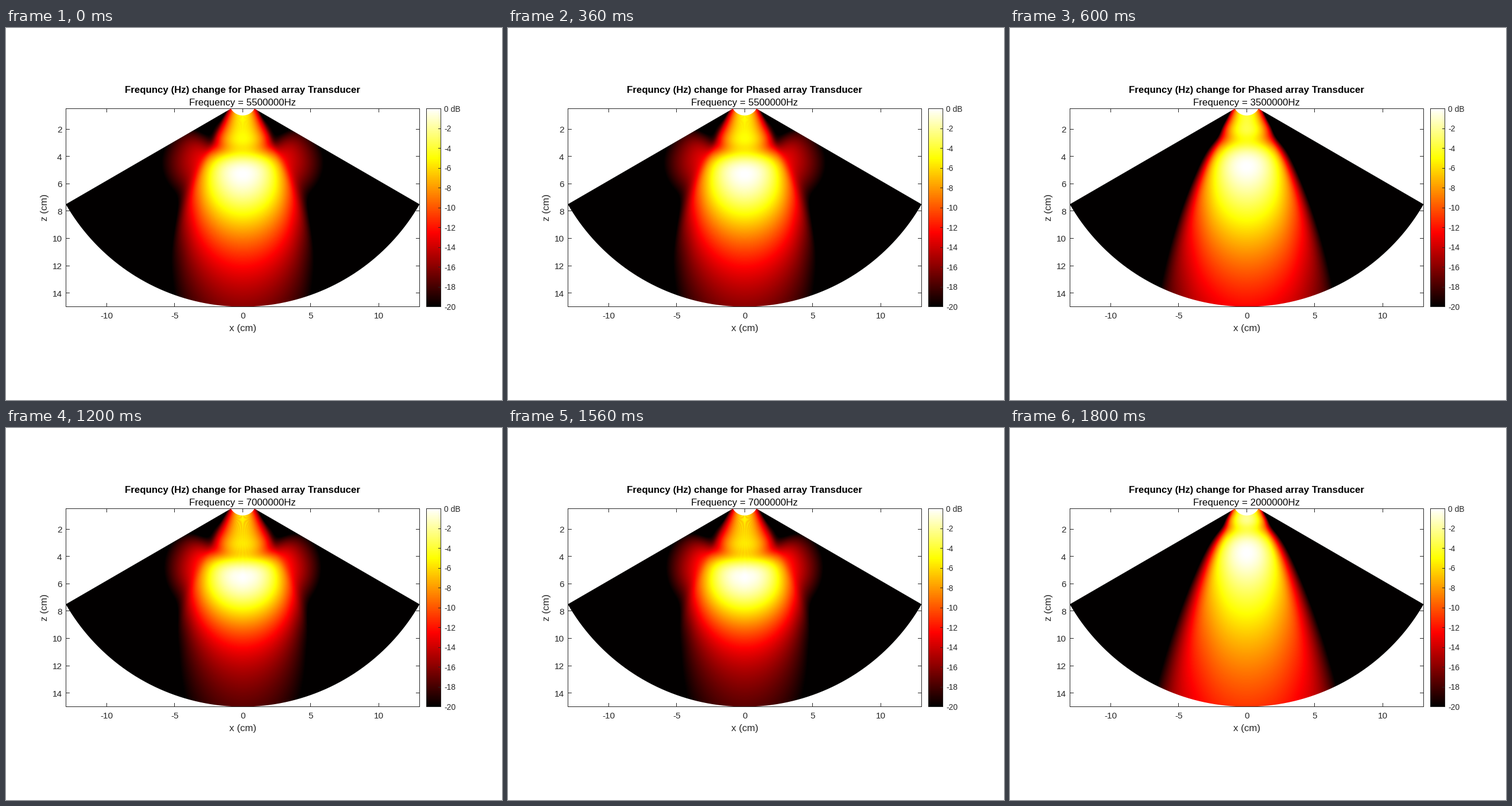
A matplotlib script that plays this animation: 864x648 px, repeating every 2400 ms.

```python
import numpy as np
import matplotlib.pyplot as plt
from matplotlib.animation import FuncAnimation
from matplotlib.colors import ListedColormap
from matplotlib.path import Path

W, H = 864, 648
GREY = "#262626"
FREQS = [5.5, 3.5, 7.0, 2.0]  # MHz

# Plot box and colour bar, in pixels
LEFT, RIGHT, TOP, BOTTOM = 104.5, 720.5, 140.5, 485.5
BAR_L, BAR_R = 732.5, 757.5
X0, SX = 412.3, 23.72
SZ = (BOTTOM - TOP) / 14.5

# Phased array: millimetres and microseconds
C = 1.54
COUNT, PITCH, WIDTH = 64, 0.3, 0.25
HEIGHT, FOCUS = 14.0, 60.0
BAND = 0.74
ELEMENTS = (np.arange(COUNT) - (COUNT - 1) / 2) * PITCH
APODIZATION = np.cos(np.linspace(-1, 1, COUNT) * np.pi / 2)
# Virtual point source behind the array, for a wave 60 degrees wide
SOURCE_DEPTH = ELEMENTS[-1] / np.tan(np.radians(30))

# Gaussian expansion of the aperture in elevation
GA = np.array([0.187 + 0.275j, 0.288 - 1.954j])
GB = np.array([4.558 - 25.59j, 8.598 - 7.924j])
GA = np.concatenate([GA, GA.conj()])
GB = np.concatenate([GB, GB.conj()])

RADII = np.geomspace(10, 150, 90)
ANGLES = np.radians(np.linspace(0, 60, 51))


def px(x):
    return X0 + SX * x


def py(z):
    return TOP + SZ * (z - 0.5)


def spectrum(nu):
    """Transmit spectrum at frequency nu, relative to the centre."""
    pulse = np.sinc(nu - 1) - np.sinc(nu + 1)
    p = np.log(126) / np.log(2 / BAND)
    scale = BAND / 2 / np.log(2) ** (1 / p)
    return pulse * np.exp(-0.5 * (np.abs(nu - 1) / scale) ** p)


def pressure_db(fc, df=0.07):
    """RMS pressure of a diverging wave on the half sector, in dB."""
    x = (RADII[:, None] * np.sin(ANGLES))[..., None]
    z = (RADII[:, None] * np.cos(ANGLES))[..., None]
    dist = np.hypot(x - ELEMENTS, z)
    sine = (x - ELEMENTS) / dist
    time = (dist + np.hypot(ELEMENTS, SOURCE_DEPTH)) / C

    freqs = np.arange(0.4 * fc, 1.6 * fc, df)
    wave = APODIZATION * z / dist ** 2 * np.exp(2j * np.pi * freqs[0] * time)
    step = np.exp(2j * np.pi * df * time)

    # The elevation factor depends on distance only, so look it up
    grid = np.arange(1, 1800)[:, None] / 10
    cell = np.rint(dist * 10).astype(int) - 1
    curve = np.pi * HEIGHT ** 2 / C * (1 / grid - 1 / FOCUS)

    power = 0
    for f, weight in zip(freqs, spectrum(freqs / fc)):
        elevation = (GA / np.sqrt(GB - 1j * f * curve)).sum(-1)
        directivity = np.sinc(WIDTH * f / C * sine)
        total = (wave * directivity * elevation[cell]).sum(-1)
        power = power + np.abs(weight * total) ** 2
        wave *= step
    return 10 * np.log10(power / power.max())


def to_pixels(db):
    """Bilinear lookup of the polar field at every pixel of the box."""
    x = (np.arange(104, 721) + 0.5 - X0) / SX * 10
    z = ((np.arange(140, 486) + 0.5 - TOP) / SZ + 0.5)[:, None] * 10
    nr, na = len(RADII) - 1, len(ANGLES) - 1
    u = np.log(np.hypot(x, z) / RADII[0]) / np.log(RADII[-1] / RADII[0])
    v = np.arctan2(np.abs(x), z) / ANGLES[-1]
    u, v = np.clip(u * nr, 0, nr - 0.001), np.clip(v * na, 0, na - 0.001)
    i, j = u.astype(int), v.astype(int)
    u, v = u - i, v - j
    near = db[i, j] * (1 - v) + db[i, j + 1] * v
    far = db[i + 1, j] * (1 - v) + db[i + 1, j + 1] * v
    return near * (1 - u) + far * u


def hot():
    i = np.arange(1, 257)
    rgb = np.stack([i / 96, (i - 96) / 96, (i - 192) / 64], axis=1)
    return ListedColormap(np.clip(rgb, 0, 1))


def sector():
    a = np.radians(np.linspace(-60, 60, 241))
    outer = np.stack([px(15 * np.sin(a)), py(15 * np.cos(a))], axis=1)
    inner = np.stack([px(np.sin(a)), py(np.cos(a))], axis=1)
    return Path(np.concatenate([outer, inner[::-1]]))


def line(xs, ys, z=1):
    """One-pixel line through pixel centres."""
    ax.plot(np.floor(xs) + 0.5, np.floor(ys) + 0.5, color=GREY, lw=1,
            zorder=z, solid_capstyle="projecting", snap=False)


def frame_box(l, r):
    line([l, r, r, l, l], [TOP, TOP, BOTTOM, BOTTOM, TOP], 3)


def label(x, y, s, size, ha="center", color=GREY, **kw):
    return ax.text(x, y, s, fontsize=size, ha=ha, va="baseline",
                   color=color, **kw)


plt.rcParams["font.family"] = "Liberation Sans"
fig = plt.figure(figsize=(W / 72, H / 72), dpi=72, facecolor="white")
ax = fig.add_axes([0, 0, 1, 1])
ax.axis("off")

fields = [to_pixels(pressure_db(f)) for f in FREQS]
style = dict(cmap=hot(), vmin=-20, vmax=0, interpolation="nearest",
             aspect="auto", zorder=2)
image = ax.imshow(fields[0], extent=(104, 721, 486, 140), **style)
ramp = np.linspace(0, -20, 256)[:, None]
ax.imshow(ramp, extent=(BAR_L, BAR_R, BOTTOM, TOP), **style)
ax.set_xlim(0, W)
ax.set_ylim(H, 0)
image.set_clip_path(sector(), ax.transData)

frame_box(LEFT, RIGHT)
frame_box(BAR_L, BAR_R)

for x in (-10, -5, 0, 5, 10):
    line([px(x)] * 2, [BOTTOM, BOTTOM - 6])
    line([px(x)] * 2, [TOP, TOP + 6])
    label(px(x), 506, str(x), 15.4)
for z in range(2, 15, 2):
    line([LEFT, LEFT + 6], [py(z)] * 2)
    line([RIGHT, RIGHT - 6], [py(z)] * 2)
    label(97.5, py(z) + 5.8, str(z), 15.4, "right")
for k in range(11):
    y = TOP + (BOTTOM - TOP) * k / 10
    line([BAR_R - 4, BAR_R], [y, y], 3)
    label(763, y + 5.2, f"{-2 * k}" if k else "0 dB", 13.9, "left")

label(X0, 528, "x (cm)", 16.9)
label(72, 313, "z (cm)", 16.9, rotation=90, rotation_mode="anchor")
label(X0, 112.5, "Frequncy (Hz) change for Phased array Transducer", 16.9,
      color="black", weight="bold")
subtitle = label(X0, 135, "", 16.9, color="black")


def draw(n):
    image.set_data(fields[n])
    subtitle.set_text(f"Frequency = {FREQS[n] * 1e6:.0f}Hz")
    return image, subtitle


anim = FuncAnimation(fig, draw, frames=len(FREQS), interval=600,
                     repeat=True, repeat_delay=0)
plt.show()
```
